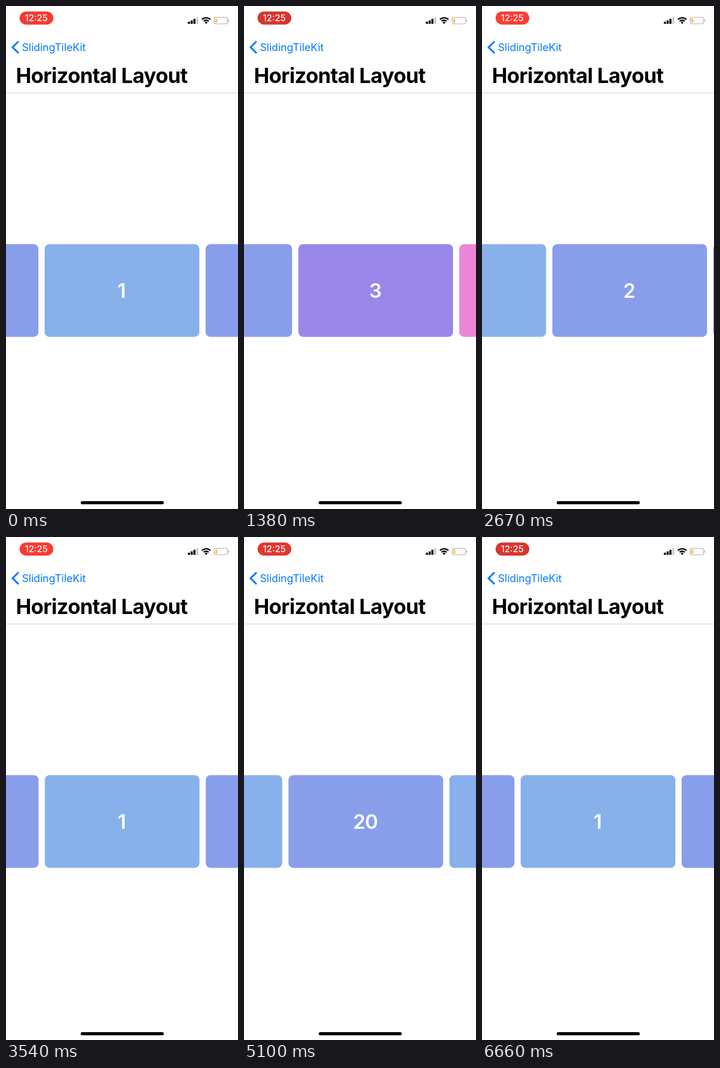
Write an HTML page that moves like this. It is 444x960 px and loops after 6690 ms.

```html
<!DOCTYPE html>
<html lang="en">
<head>
<meta charset="utf-8">
<title>Horizontal carousel</title>
<style>
  html, body { margin: 0; width: 100%; height: 100%; overflow: hidden; background: #fff; }
  svg { display: block; width: 444px; height: 960px; }
  text { font-family: Inter, Roboto, sans-serif; font-optical-sizing: none; }
  #time, #cards text { fill: #fff; text-anchor: middle; }
  #time { font-size: 17px; font-weight: 500; }
  #cards text { font-size: 38px; font-weight: 600; letter-spacing: -1px; }
  #back { font-size: 20px; fill: #007aff; }
  #title { font-size: 39.5px; font-weight: 700; letter-spacing: -.68px; }
</style>
</head>
<body>
<svg viewBox="0 0 444 960">
  <rect id="pill" x="26" y="10.5" width="64.5" height="25" rx="12.5"/>
  <text id="time" x="58" y="29">12:25</text>

  <!-- signal, wifi, battery -->
  <path d="M348 30h4v4h-4zM353.3 27.5h4v6.5h-4zM358.6 24.5h4v9.5h-4z"/>
  <path d="M364 21.5h4v12.5h-4z" fill="#ccc"/>
  <g fill="none" stroke="#000" stroke-width="2.6">
    <path d="M375 25.7a11.8 11.8 0 0 1 16.2 0"/>
    <path d="M378.3 29a7.1 7.1 0 0 1 9.6 0"/>
  </g>
  <path d="M380.3 31.3a4.2 4.2 0 0 1 5.6 0l-2.8 3z"/>
  <rect x="398.5" y="21.5" width="25.5" height="12.5" rx="3.5" fill="none" stroke="#a6a6a6" stroke-width="1.2"/>
  <path d="M425.5 25.5q1.8 .5 1.8 2.3t-1.8 2.3z" fill="#a6a6a6"/>
  <rect x="400.5" y="23.5" width="4" height="8.5" rx="1.5" fill="#ffcc30"/>

  <!-- navigation bar -->
  <path d="M24 67.5L12.5 78.7L24 90" fill="none" stroke="#007aff" stroke-width="3.3"/>
  <text id="back" x="30.5" y="85.5">SlidingTileKit</text>
  <text id="title" x="19" y="147">Horizontal Layout</text>
  <rect y="165.5" width="444" height="1" fill="#ccccd0"/>

  <g id="cards"></g>
  <rect x="143" y="945" width="159" height="6" rx="3"/>
</svg>
<script>
  const LOOP = 6690, STEP = 30, PITCH = 308, COUNT = 20, SWIPE = 550;
  const FIRST = -3;
  const COLORS = ['#88cceb', '#88b0eb', '#889eeb', '#88b0eb', '#889eeb', '#9a87ea', '#eb86d6'];
  // [start time, pages moved]
  const SWIPES = [
    [230, 1], [976, 1], [1755, -1], [2524, -1],
    [3530, -1], [3878, -1], [4650, 1], [5379, 1]
  ];
  const cards = document.getElementById('cards');
  const pill = document.getElementById('pill');

  cards.innerHTML = COLORS.map((color, k) => {
    const i = FIRST + k, x = 74 + i * PITCH;
    return `<rect x="${x}" y="454.5" width="296" height="177" rx="9" fill="${color}"/>
      <text x="${x + 147}" y="557">${(i + COUNT) % COUNT + 1}</text>`;
  }).join('');

  const ease = u => 1 - (1 - u * u) ** 3;
  const clamp = u => Math.min(1, Math.max(0, u));
  const page = t => SWIPES.reduce((p, [start, d]) => p + d * ease(clamp((t - start) / SWIPE)), 0);
  const mix = (a, b, k) => a + (b - a) * k;

  function draw(now) {
    const t = Math.floor(now % LOOP / STEP) * STEP;
    cards.setAttribute('transform', `translate(${-page(t) * PITCH} 0)`);

    // the recording pill dims briefly every 1760 ms
    const glow = clamp(1 - Math.cos((t - 1380) / 1760 * 2 * Math.PI));
    pill.setAttribute('fill', `rgb(${mix(217, 255, glow)} ${mix(52, 59, glow)} ${mix(45, 50, glow)})`);
    requestAnimationFrame(draw);
  }
  draw(0);
</script>
</body>
</html>
```
